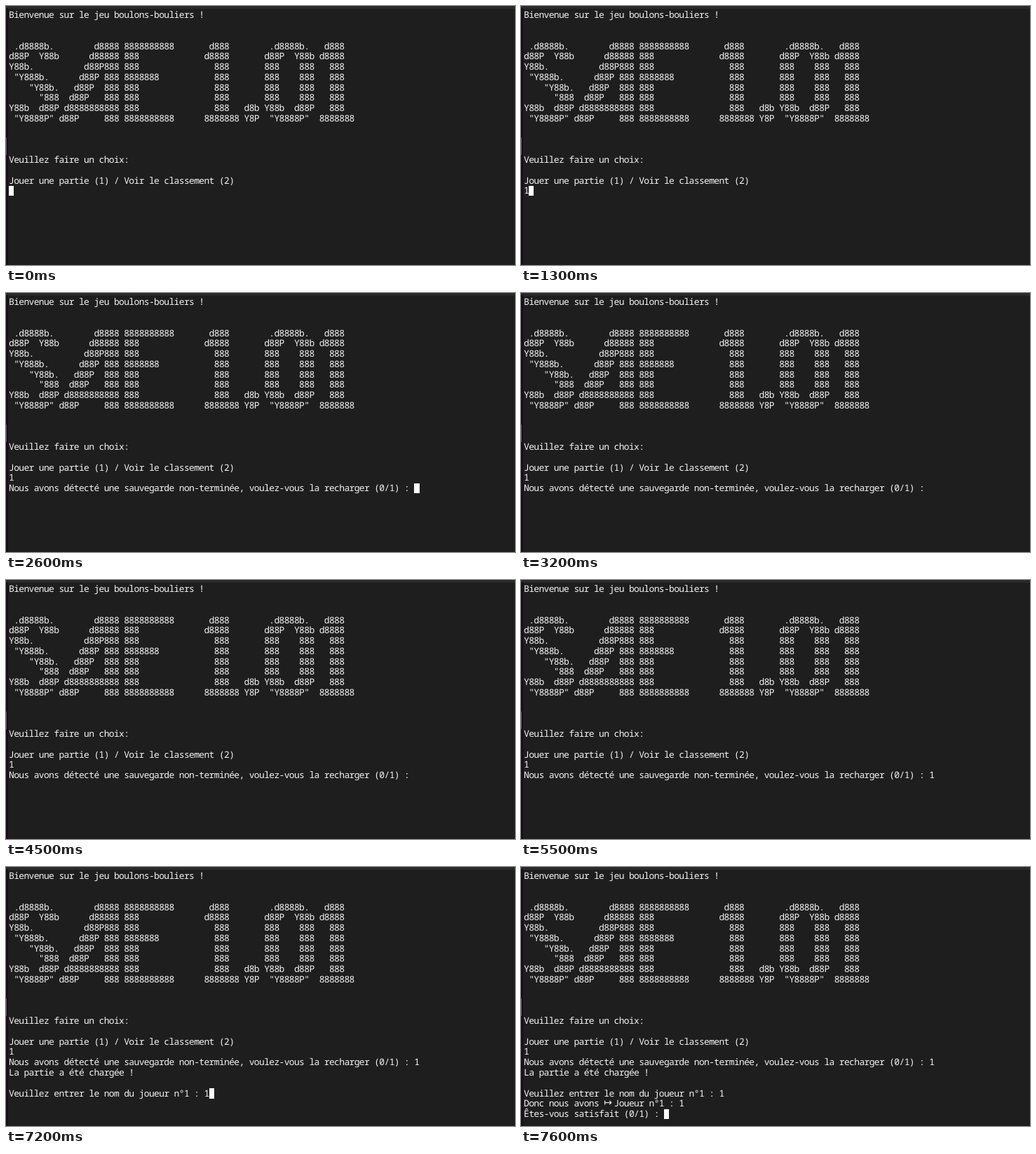
Recreate the animation shown at these times as an HTML page. Size 726 by 370 pixels, loop 8000 ms.

```html
<!DOCTYPE html>
<html lang="fr">
<head>
<meta charset="utf-8">
<title>Terminal</title>
<style>
  html, body { margin: 0; width: 100%; height: 100%; overflow: hidden; background: #1e1e1e; }
  body { position: relative; }
  div, pre { position: absolute; margin: 0; }
  #bar { left: 0; top: 0; width: 100%; height: 4px; background: #2b2a2b; }
  #edge { left: 0; top: 3px; width: 3px; bottom: 0; background: #180e19; }
  #grip { left: 0; top: 188px; width: 1px; height: 25px; background: #5c555d; }
  #screen {
    left: 4px; top: 5.2px; color: #f4f4f4;
    font: 13px/14.78px "Noto Sans Mono", "DejaVu Sans Mono", monospace;
    letter-spacing: calc(7.14px - 1ch);
    font-variant-ligatures: none; text-rendering: geometricPrecision;
  }
  #screen i {
    display: inline-block; width: 7.14px; height: 14px; vertical-align: top;
    font: 14px/14px "DejaVu Sans", sans-serif; letter-spacing: 0;
  }
  #cursor { width: 7.2px; height: 14.5px; background: #fff; }
</style>
</head>
<body>
<div id="bar"></div>
<div id="edge"></div>
<div id="grip"></div>
<pre id="screen"></pre>
<div id="cursor"></div>
<script>
const LOOP = 8000, LEFT = 4, TOP = 5.7, CELL = 7.14, ROW = 14.78, BLINK = 600;
const screenEl = document.getElementById('screen');
const cursorEl = document.getElementById('cursor');

const intro = `Bienvenue sur le jeu boulons-bouliers !


 .d8888b.        d8888 8888888888       d888        .d8888b.   d888
d88P  Y88b      d88888 888             d8888       d88P  Y88b d8888
Y88b.          d88P888 888               888       888    888   888
 "Y888b.      d88P 888 8888888           888       888    888   888
    "Y88b.   d88P  888 888               888       888    888   888
      "888  d88P   888 888               888       888    888   888
Y88b  d88P d8888888888 888               888   d8b Y88b  d88P   888
 "Y8888P" d88P     888 8888888888      8888888 Y8P  "Y8888P"  8888888



Veuillez faire un choix:

Jouer une partie (1) / Voir le classement (2)
`;

// Each entry: time in ms, output added then; the cursor blink restarts there
const steps = [
  [0, intro],
  [1290, '1'],
  [2590, '\nNous avons détecté une sauvegarde non-terminée, voulez-vous la recharger (0/1) : '],
  [4850, '1'],
  [5800, '\nLa partie a été chargée !\n\nVeuillez entrer le nom du joueur n°1 : '],
  [7190, '1'],
  [7500, '\nDonc nous avons ↦ Joueur n°1 : 1\nÊtes-vous satisfait (0/1) : ']
];

let shown = 0;

function print(count) {
  const text = steps.slice(0, count).map(step => step[1]).join('');
  const lines = text.split('\n');
  screenEl.innerHTML = text.replace('↦', '<i>↦</i>');
  cursorEl.style.left = LEFT + lines.at(-1).length * CELL + 'px';
  cursorEl.style.top = TOP + (lines.length - 1) * ROW + 'px';
  shown = count;
}

function draw(now) {
  const t = now % LOOP;
  const count = steps.filter(step => step[0] <= t).length;
  if (count !== shown) print(count);
  const idle = t - steps[count - 1][0];
  cursorEl.style.visibility = idle % (2 * BLINK) < BLINK ? 'visible' : 'hidden';
  requestAnimationFrame(draw);
}
draw(0);
</script>
</body>
</html>
```
